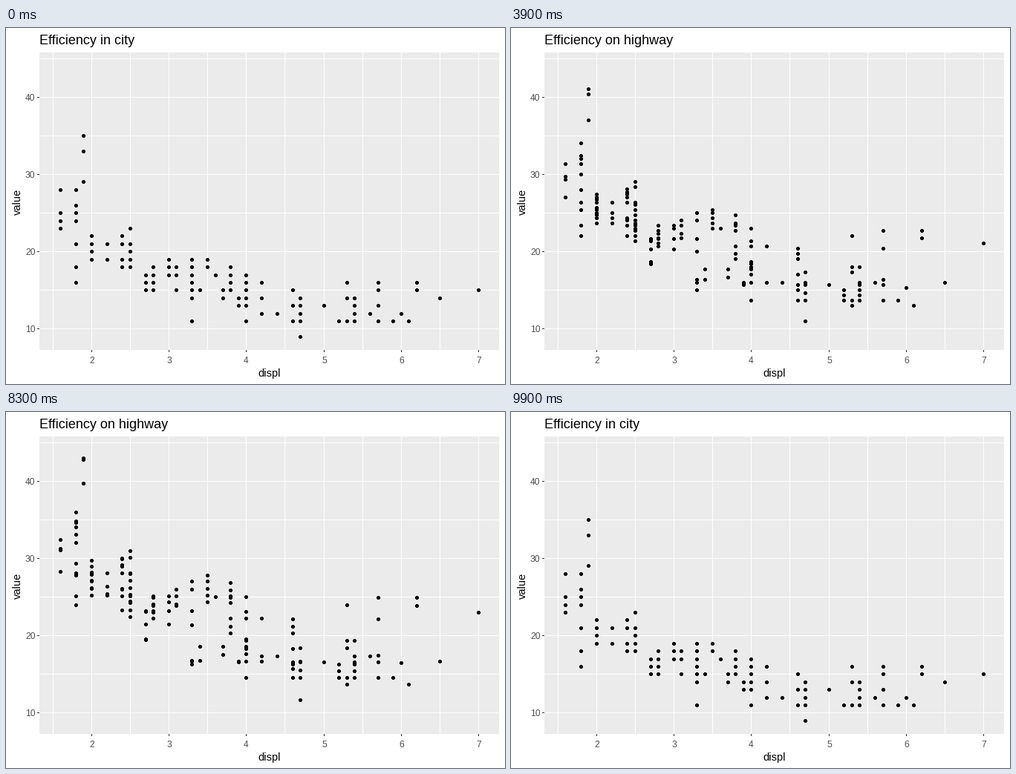
A matplotlib script that plays this animation: 672x480 px, repeating every 10 s.

```python
import numpy as np
import matplotlib.pyplot as plt
from matplotlib.animation import FuncAnimation
from matplotlib.collections import PolyCollection
from matplotlib.patches import Rectangle

plt.rcParams["font.family"] = "Liberation Sans"

WIDTH, HEIGHT = 672, 480
LEFT, TOP, RIGHT, BOTTOM = 45, 33, 664, 434
FRAMES, STEP_MS = 100, 100
TWEEN = 23
TO_HIGHWAY, TO_CITY = 26, 76

# Engine size -> city mileage -> highway mileages
SMALL = {
    1.6: {23: [29], 24: [32], 25: [32], 28: [33]},
    1.8: {16: [25], 18: [26, 29], 21: [29], 24: [30, 33, 36], 25: [36],
          26: [34, 35], 28: [37]},
    1.9: {29: [41], 33: [44], 35: [44]},
    2.0: {19: [26, 27, 28, 29], 20: [27, 28, 31], 21: [29, 30], 22: [29]},
    2.2: {19: [26], 21: [26, 27, 29]},
    2.4: {18: [24, 26, 27], 19: [27], 21: [29, 30, 31], 22: [30, 31]},
    2.5: {18: [23, 24, 25, 26], 19: [25, 26], 20: [25, 26, 27, 28, 29],
          21: [29], 23: [31, 32]},
}
MEDIUM = {
    2.7: {15: [20], 16: [20, 24], 17: [22, 24]},
    2.8: {15: [24, 25], 16: [23, 26], 17: [24, 25], 18: [26]},
    3.0: {17: [22, 24], 18: [26], 19: [25]},
    3.1: {15: [25], 17: [25], 18: [26, 27]},
    3.3: {11: [17], 14: [17], 15: [17], 16: [22], 17: [24], 18: [27], 19: [28]},
    3.4: {15: [17, 19]},
    3.5: {18: [29], 19: [25, 26, 27, 28]},
    3.6: {17: [26]},
    3.7: {14: [18], 15: [19]},
    3.8: {15: [21, 22], 16: [23, 26], 17: [27], 18: [25, 26, 28]},
    3.9: {13: [17], 14: [17]},
}
LARGE = {
    4.0: {11: [15], 13: [19], 14: [17, 20], 15: [18, 19, 20],
          16: [20, 23, 24], 17: [26]},
    4.2: {12: [18], 14: [17], 16: [23]},
    4.4: {12: [18]},
    4.6: {11: [15, 17], 13: [16, 17, 19], 15: [21, 22, 23]},
    4.7: {9: [12], 11: [15], 12: [16], 13: [17], 14: [17, 19]},
    5.0: {13: [17]},
    5.2: {11: [15, 16, 17]},
    5.3: {11: [14, 15], 14: [19, 20], 16: [25]},
    5.4: {11: [15, 16, 17], 12: [18], 13: [17], 14: [20]},
    5.6: {12: [18]},
    5.7: {11: [15], 13: [17, 18], 15: [23], 16: [26]},
    5.9: {11: [15]},
    6.0: {12: [17]},
    6.1: {11: [14]},
    6.2: {15: [25], 16: [26]},
    6.5: {14: [17]},
    7.0: {15: [24]},
}
displ, city, highway = np.array([
    (size, cty, hwy)
    for group in (SMALL, MEDIUM, LARGE)
    for size, rows in group.items()
    for cty, hwys in rows.items()
    for hwy in hwys
]).T

# Pixelated 5 x 5 disc around its centre pixel
DISC = np.array([(-1, -2), (2, -2), (2, -1), (3, -1), (3, 2), (2, 2),
                 (2, 3), (-1, 3), (-1, 2), (-2, 2), (-2, -1), (-1, -1)])


def px(value):
    return np.floor(73.48 + 104.3 * (value - 1.6))


def py(value):
    return np.floor(51.62 + 10.422 * (44 - value))


def ease(t):
    """Cubic ease in and out, clamped to 0..1."""
    t = min(max(t, 0), 1)
    return 4 * t ** 3 if t < 0.5 else 1 - 4 * (1 - t) ** 3


fig = plt.figure(figsize=(WIDTH / 96, HEIGHT / 96), dpi=96, facecolor="white")
ax = fig.add_axes([0, 0, 1, 1])
ax.set_xlim(0, WIDTH)
ax.set_ylim(HEIGHT, 0)
ax.axis("off")


def box(x, y, w, h, color):
    ax.add_patch(Rectangle((x, y), w, h, facecolor=color, linewidth=0))


def label(x, y, text, size, color="black", **kwargs):
    return ax.text(x, y, text, fontsize=size * 0.75, color=color,
                   va="baseline", **kwargs)


box(LEFT, TOP, RIGHT - LEFT, BOTTOM - TOP, "#EBEBEB")
for v in np.arange(1.5, 7.1, 0.5):
    box(px(v), TOP, 1, BOTTOM - TOP, "white")
for v in range(10, 46, 5):
    box(LEFT, py(v), RIGHT - LEFT, 1, "white")
for v in range(2, 8):
    box(px(v), BOTTOM, 1, 3, "#333333")
    label(px(v) + 0.5, 452, str(v), 12, "#4D4D4D", ha="center")
for v in range(10, 41, 10):
    box(LEFT - 3, py(v), 3, 1, "#333333")
    label(39.5, py(v) + 5, str(v), 12, "#4D4D4D", ha="right")

label(355, 470, "displ", 14.67, ha="center")
label(20, 234, "value", 14.67, ha="center", rotation=90, rotation_mode="anchor")
title = label(45, 22, "", 18, ha="left")
dots = PolyCollection([], facecolors="black", edgecolors="none",
                      linewidths=0, zorder=3)
ax.add_collection(dots, autolim=False)


def draw(frame):
    if frame < TO_CITY:
        t = (frame - TO_HIGHWAY) / TWEEN
    else:
        t = 1 - (frame - TO_CITY) / TWEEN
    value = city + (highway - city) * ease(t)
    centres = np.unique(np.column_stack([px(displ), py(value + 1e-9)]), axis=0)
    dots.set_verts(centres[:, None, :] + DISC)
    title.set_text("Efficiency on highway" if t > 0.5 else "Efficiency in city")
    return dots, title


animation = FuncAnimation(fig, draw, frames=FRAMES, interval=STEP_MS,
                          repeat=True, repeat_delay=0)
plt.show()
```
